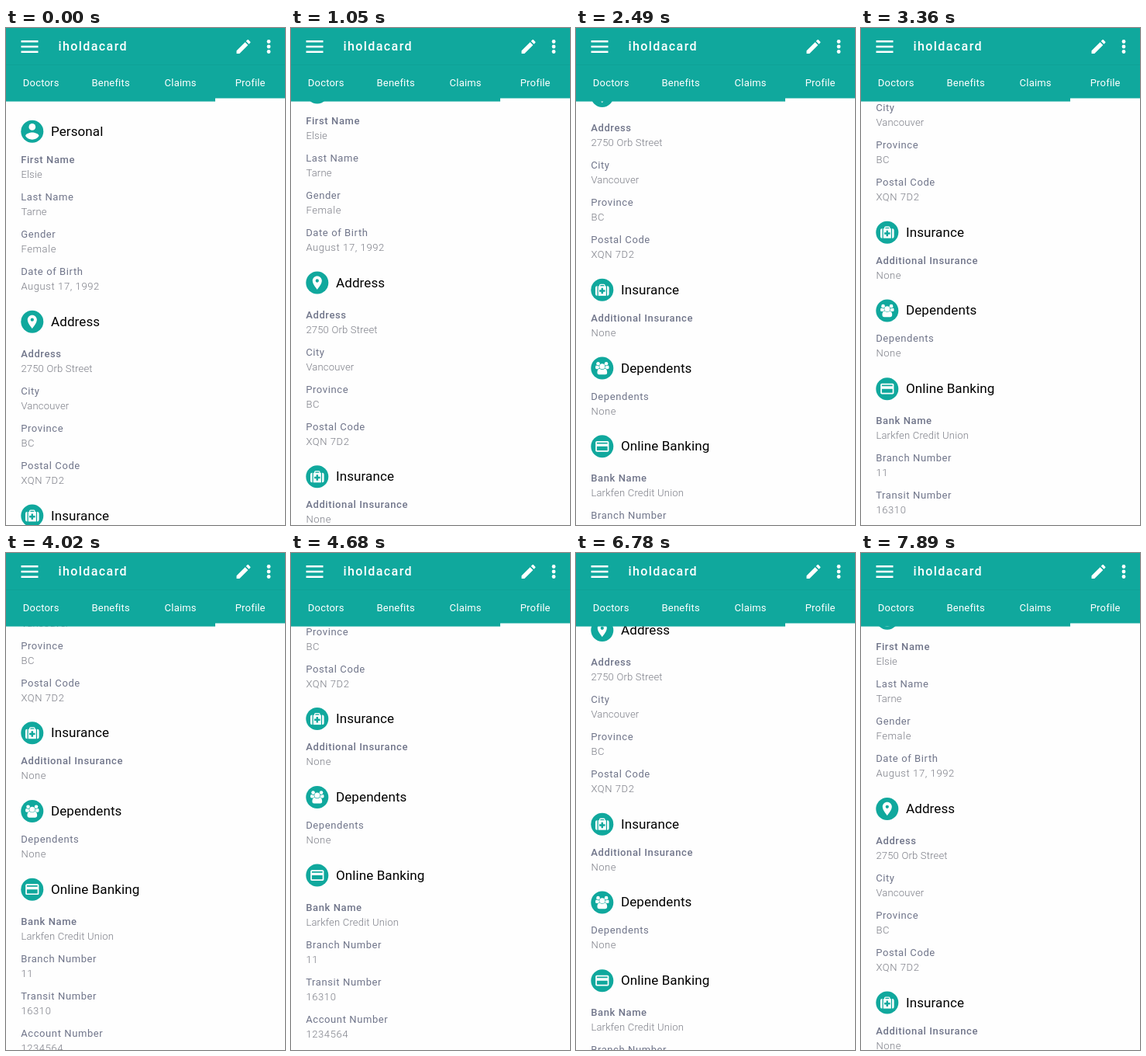
Animation of 360 by 640 pixels, one loop 8 s. Source, as an HTML page:

```html
<!DOCTYPE html>
<html lang="en">
<head>
<meta charset="utf-8">
<title>Profile</title>
<style>
  html, body { margin: 0; width: 100%; height: 100%; overflow: hidden; background: #fefefe; }
  svg { display: block; width: 100%; height: 100%; font-family: Roboto, sans-serif; }
  .teal { fill: #10a89d; }
  .white { fill: #fff; }
  .brand { font-size: 16px; font-weight: 500; letter-spacing: 1.4px; }
  .tab { font-size: 13px; letter-spacing: .2px; text-anchor: middle; }
  .heading { font-size: 17px; letter-spacing: .1px; fill: #000; }
  .label { font-size: 13px; letter-spacing: .6px; fill: #70758a; }
  .strong { font-weight: 500; }
  .value { font-size: 13px; font-weight: 300; letter-spacing: .6px; fill: #7b7d86; }
  .tight { letter-spacing: .2px; }
</style>
</head>
<body>
<svg viewBox="0 0 360 640">
  <defs>
    <g id="person" class="white" transform="scale(1.45) translate(-12 -12)">
      <circle cx="12" cy="8" r="3"/>
      <path d="M12 19.2c-2.5 0-4.71-1.28-6-3.22.03-1.99 4-3.08 6-3.08 1.99 0 5.97 1.09 6 3.08-1.29 1.94-3.5 3.22-6 3.22z"/>
    </g>
    <path id="pin" class="white" fill-rule="evenodd" transform="scale(.86) translate(-12 -12)"
      d="M12 2C8.13 2 5 5.13 5 9c0 5.25 7 13 7 13s7-7.75 7-13c0-3.87-3.13-7-7-7zm0 9.5a2.5 2.5 0 0 1 0-5 2.5 2.5 0 0 1 0 5z"/>
    <g id="kit" class="white">
      <path d="M-3.1-4.6V-6q0-.9.9-.9h4.4q.9 0 .9.9v1.4" fill="none" stroke="#fff" stroke-width="1.3"/>
      <path id="flap" d="M-6.3-5V7.5h-.3a2.2 2.2 0 0 1-2.2-2.2v-8.100a2.200 2.200 0 0 1 2.200-2.200z"/>
      <use href="#flap" transform="scale(-1 1)"/>
      <rect x="-5" y="-5" width="10" height="12.500"/>
      <path class="teal" d="M-1.250-2.500h2.500V0h2.500v2.500h-2.500V5h-2.500V2.500h-2.500V0h2.500z"/>
    </g>
    <g id="people" class="white">
      <g id="side">
        <circle cx="-5.250" cy="-5.800" r="2.300"/>
        <path d="M-3.350 0q-1.500 0-2.400 1.150H-7q-1.750 0-1.750-1.450 0-3.200 1.150-3.200 1 .75 2.350.75.650 0 1.200-.2-.3 1.650.7 2.950z"/>
      </g>
      <use href="#side" transform="scale(-1 1)"/>
      <circle cy="-2.300" r="3.500"/>
      <path d="M-3.250.6Q-1.700 1.850 0 1.850T3.250.6c2.300 0 3.150 2 3.150 5.200q0 2.400-2.400 2.400h-8q-2.400 0-2.400-2.400c0-3.200.850-5.200 3.150-5.200z"/>
    </g>
    <path id="card" class="white" fill-rule="evenodd" transform="scale(.86) translate(-12 -12)"
      d="M20 4H4c-1.110 0-2 .89-2 2v12c0 1.110.89 2 2 2h16c1.110 0 2-.89 2-2V6c0-1.110-.89-2-2-2zm0 14H4v-6h16v6zm0-10H4V6h16v2z"/>
  </defs>

  <rect width="360" height="640" fill="#fefefe"/>
  <g id="page"></g>

  <rect class="teal" width="360" height="94.600"/>
  <rect y="47" width="360" height="1" opacity=".035"/>
  <rect class="white" x="270" y="90.500" width="90" height="4.500"/>
  <path d="M19.500 17.300h22m-22 6.700h22m-22 6.700h22" stroke="#fff" stroke-width="2.400"/>
  <g class="white">
    <text class="brand" x="67.500" y="29">iholdacard</text>
    <path transform="translate(294.500 12)" d="M3 17.250V21h3.750L17.810 9.940l-3.750-3.750L3 17.250zM20.710 7.040c.39-.39.39-1.020 0-1.410l-2.340-2.340c-.39-.39-1.020-.39-1.410 0l-1.830 1.830 3.750 3.750 1.830-1.830z"/>
    <circle cx="339" cy="17.500" r="2.400"/>
    <circle cx="339" cy="24" r="2.400"/>
    <circle cx="339" cy="30.500" r="2.400"/>
    <g id="tabs"></g>
  </g>
</svg>

<script>
const page = document.getElementById('page');

// A "~" before a value marks tighter letter spacing.
const sections = [
  { title: 'Personal', icon: 'person', y: 133.2, firstRow: 174, rows: [
    ['First Name', '~Elsie'], ['Last Name', '~Tarne'],
    ['Gender', 'Female'], ['Date of Birth', 'August 17, 1992']] },
  { title: 'Address', icon: 'pin', y: 378.3, firstRow: 424, rows: [
    ['Address', '~2750 Orb Street'], ['City', '~Vancouver'],
    ['Province', 'BC'], ['Postal Code', 'XQN 7D2']] },
  { title: 'Insurance', icon: 'kit', y: 628, firstRow: 668.6, rows: [
    ['Additional Insurance', 'None']] },
  { title: 'Dependents', icon: 'people', y: 728.8, plain: true, firstRow: 769.2, rows: [
    ['Dependents', 'None']] },
  { title: 'Online Banking', icon: 'card', y: 829.5, firstRow: 875, rows: [
    ['Bank Name', '~Larkfen Credit Union'], ['Branch Number', '11'],
    ['Transit Number', '16310'], ['Account Number', '1234564']] }
];

const text = (style, x, y, content) => `<text class="${style}" x="${x}" y="${y}">${content}</text>`;

function row([label, value], y, strong) {
  const tight = value.startsWith('~');
  return text(strong ? 'label strong' : 'label', 19.2, y, label) +
    text(tight ? 'value tight' : 'value', 19.4, y + 19, value.replace('~', ''));
}

page.innerHTML = sections.map(s =>
  `<g transform="translate(33.8 ${s.y})"><circle class="teal" r="14.5"/><use href="#${s.icon}"/></g>` +
  text('heading', 58, s.y + 5.5, s.title) +
  s.rows.map((r, i) => row(r, s.firstRow + i * 48, i === 0 && !s.plain)).join('')
).join('');

document.getElementById('tabs').innerHTML = ['Doctors', 'Benefits', 'Claims', 'Profile']
  .map((name, i) => text('tab', 45.2 + i * 90, 75, name)).join('');

function bezier(x1, y1, x2, y2) {
  const curve = (a, b, u) => 3 * a * u * (1 - u) ** 2 + 3 * b * u * u * (1 - u) + u ** 3;
  return x => {
    if (x <= 0) return 0;
    if (x >= 1) return 1;
    let low = 0, high = 1;
    for (let i = 0; i < 30; i++) {
      const mid = (low + high) / 2;
      if (curve(x1, x2, mid) < x) low = mid; else high = mid;
    }
    return curve(y1, y2, low);
  };
}

const LOOP = 8000, STEP = 110.6, FIRST_STEP = 585, DISTANCE = 424.3;
const easeDown = bezier(.232, .1, .2, 1);
const easeUp = bezier(.28, 0, .176, 1);

// The page moves in discrete steps, down and then back up.
function scrollAt(time) {
  const step = Math.floor((time - FIRST_STEP) / STEP);
  return DISTANCE * (easeDown((step + 1) / 48) - easeUp((step - 49.5) / 28));
}

const start = performance.now();
function draw() {
  const time = (performance.now() - start) % LOOP;
  const offset = time < FIRST_STEP ? 0 : scrollAt(time);
  page.setAttribute('transform', `translate(0 ${-offset.toFixed(2)})`);
  requestAnimationFrame(draw);
}
draw();
</script>
</body>
</html>
```
